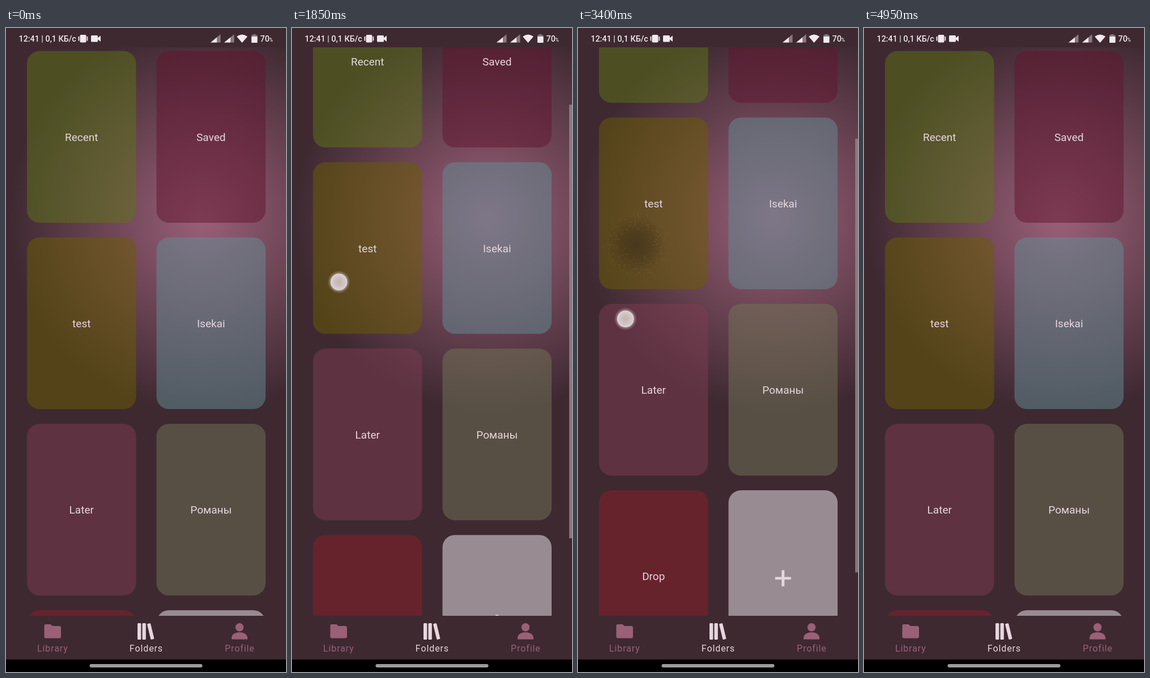
An HTML page with a canvas for the animation above (5150 ms loop, 494 by 1134 pixels).

```html
<!DOCTYPE html>
<html lang="en">
<head>
<meta charset="utf-8">
<title>Folders</title>
<style>
html, body { margin: 0; width: 100%; height: 100%; overflow: hidden; background: #3e2931; }
canvas { display: block; }
</style>
</head>
<body>
<canvas id="stage" width="494" height="1134"></canvas>
<script>
const ctx = document.getElementById('stage').getContext('2d');
const LOOP = 5150, BG = '#3e2931', ACCENT = '#9a6078', INK = '#e6d6dd';
const VIEW = { top: 34, bottom: 1035 }, VIEW_H = VIEW.bottom - VIEW.top;
const MAX_SCROLL = 311.5, CARD_W = 192.5, CARD_H = 302.3, ROW = 328.2, RADIUS = 22;
const IMPACT = 1978, PRESS = 3300;

const cards = [
  ['Recent', '#5c7717'], ['Saved', '#63142e'],
  ['test', '#6a5f01'], ['Isekai', '#648d95'],
  ['Later', '#7e3d51'], ['Романы', '#727759'],
  ['Drop', '#8e1f29'], ['+', '#f4edf3'],
];

const ramp = (t, from, to) => Math.min(1, Math.max(0, (t - from) / (to - from)));
const smooth = p => p * p * (3 - 2 * p);
const mix = (a, b, p) => a + (b - a) * p;
// Quick appearance at `on`, fade-out from `off` over `fade` ms.
const pulse = (t, on, off, fade) => ramp(t, on - 20, on) * (1 - ramp(t, off, off + fade));

const scrollAt = t => MAX_SCROLL * (ramp(t, 1700, IMPACT) ** 1.4 - smooth(ramp(t, 3260, 3632)));

// Overscroll: sharp rise when the fling hits the end, then a soft decay.
function stretchAt(t) {
  const u = Math.max(0, t - IMPACT) / 70;
  return 1 + .0248 * u * Math.exp(1 - u);
}

function random(seed) {
  return () => (seed = (seed * 16807) % 2147483647) / 2147483647;
}

function box(x, y, w, h, r, color) {
  ctx.fillStyle = color;
  ctx.beginPath();
  ctx.roundRect(x, y, w, h, r);
  ctx.fill();
}

function disc(x, y, r, color) {
  ctx.fillStyle = color;
  ctx.beginPath();
  ctx.arc(x, y, r, 0, 7);
  ctx.fill();
}

// Disc filled with evenly spaced radial colour stops.
function glow(x, y, r, ...colors) {
  const fill = ctx.createRadialGradient(x, y, 0, x, y, r);
  colors.forEach((c, i) => fill.addColorStop(i / (colors.length - 1), c));
  disc(x, y, r, fill);
}

function shape(path, color) {
  ctx.fillStyle = color;
  ctx.fill(new Path2D(path));
}

function text(str, x, y, font, color, align = 'center', spacing = 0) {
  ctx.font = font + ' Roboto, sans-serif';
  ctx.letterSpacing = spacing + 'px';
  ctx.textAlign = align;
  ctx.fillStyle = color;
  ctx.fillText(str, x, y);
}

// Dark press ripple with sparkles, drifting to the card's centre.
function ripple(x, y, t) {
  const p = ramp(t, PRESS, PRESS + 250);
  if (!p || t > PRESS + 300) return;
  const cx = x + mix(47, 96, p), cy = y + mix(273, 151, p), r = 130 * p;
  ctx.save();
  ctx.beginPath();
  ctx.roundRect(x, y, CARD_W, CARD_H, RADIUS);
  ctx.clip();
  ctx.globalAlpha = pulse(t, PRESS + 40, PRESS + 130, 170);
  glow(cx, cy, r, 'rgba(25,20,15,.34)', 'rgba(25,20,15,.22)', 'rgba(25,20,15,0)');
  const rnd = random(77);
  for (let i = 0; i < 300; i++) {
    const angle = rnd() * 2 * Math.PI, d = r * (.8 + (rnd() + rnd() - 1) * .4);
    ctx.fillStyle = `rgba(180,150,105,${.15 + rnd() * .35})`;
    ctx.fillRect(cx + d * Math.cos(angle), cy + d * Math.sin(angle), 1, 1);
  }
  ctx.restore();
}

function card([label, color], i, scroll, t) {
  const x = i % 2 ? 265.5 : 37, y = 40.6 + (i >> 1) * ROW - scroll;
  const cx = x + CARD_W / 2, cy = y + CARD_H / 2;
  ctx.globalAlpha = .5;
  box(x, y, CARD_W, CARD_H, RADIUS, color);
  ctx.globalAlpha = 1;
  if (label === 'test') ripple(x, y, t);
  if (label === '+') {
    box(cx - 14, cy + 1.5, 28, 4.5, 0, INK);
    box(cx - 2.5, cy - 10.5, 5, 28.5, 0, INK);
  } else {
    text(label, cx, cy + 7.2, '19px', INK);
  }
}

function list(t) {
  const scroll = scrollAt(t), total = VIEW_H + MAX_SCROLL;
  ctx.save();
  ctx.beginPath();
  ctx.rect(0, VIEW.top, 494, VIEW_H);
  ctx.clip();
  glow(346, 335, 341, ACCENT, BG);
  ctx.translate(0, VIEW.bottom);
  ctx.scale(1, stretchAt(t));
  ctx.translate(0, -VIEW.bottom);
  cards.forEach((c, i) => card(c, i, scroll, t));
  ctx.globalAlpha = .9 * (pulse(t, 1740, 2350, 250) + pulse(t, 3300, 3980, 220));
  box(489, VIEW.top + VIEW_H * scroll / total, 5, VIEW_H * VIEW_H / total, 0, '#8d8185');
  ctx.restore();
}

function statusBar() {
  const c = '#f3e9ee', dim = '#8a7880';
  text('12:41 | 0,1 КБ/с', 22.5, 24, '500 14.3px', c, 'left');
  box(130.5, 12, 11, 13.5, 2, c);
  for (const x of [127.5, 142.5]) box(x, 15, 1.8, 7.5, 0, c);
  box(150, 13, 12, 11.5, 1.5, c);
  shape('M161 18 L167 13.5 V24 L161 19.5Z', c);
  for (const x of [361, 385]) {
    shape(`M${x} 25.5 l17.5 -14.5 v14.5Z`, dim);
    shape(`M${x} 25.5 l11 -9.1 v9.1Z`, c);
  }
  shape('M407 15 Q416.5 8 426 15 L416.5 26Z', c);
  box(435.5, 11, 5, 3, 0, dim);
  box(433, 12.5, 10.5, 13.5, 1, dim);
  box(433, 15, 10.5, 11, 1, c);
  text('70', 448.5, 24, '500 14.3px', c, 'left');
  text('%', 464.5, 24, '500 8.5px', c, 'left');
}

function tabBar() {
  shape('M70 1050 H78.5 L82 1053 H94 Q97 1053 97 1056 V1071.5 Q97 1074.5 94 1074.5 H70.5 Q67.5 1074.5 67.5 1071.5 V1053 Q67.5 1050 70 1050Z', ACCENT);
  for (const x of [232, 240.5]) box(x, 1048, 6.3, 29, 1.5, INK);
  ctx.save();
  ctx.translate(255.2, 1062.5);
  ctx.rotate(-.24);
  box(-3.1, -14.3, 6.2, 28.6, 1.5, INK);
  ctx.restore();
  disc(412, 1055.3, 7.2, ACCENT);
  shape('M398 1076.5 V1074 C398 1060.5 426 1060.5 426 1074 V1076.5Z', ACCENT);
  ['Library', 'Folders', 'Profile'].forEach((label, i) =>
    text(label, 82.4 + 165 * i, 1098, '16px', i === 1 ? INK : ACCENT, 'center', .9));
  box(0, 1112, 494, 22, 0, '#000');
  box(147.5, 1120, 199, 6, 3, '#9b9b9b');
}

// Touch marker that swipes vertically between two moments, then lifts.
function swipe(t, down, move, lift, fromY, toY) {
  const p = smooth(ramp(t, move, lift));
  const x = mix(88, 81, p), y = mix(fromY, toY, p);
  ctx.globalAlpha = pulse(t, down, lift, 90);
  glow(x, y, 20, 'rgba(240,232,240,.8)', 'rgba(240,232,240,.6)', 'rgba(240,232,240,.5)', 'rgba(240,232,240,0)');
  glow(x, y, 14.8, '#c6b3b2', '#cbbab9', '#d2c5c6', '#ded3da');
  ctx.globalAlpha = 1;
}

function draw(t) {
  ctx.fillStyle = BG;
  ctx.fillRect(0, 0, 494, 1134);
  list(t);
  statusBar();
  tabBar();
  swipe(t, 1690, 1700, 1925, 616, 390);
  swipe(t, 3220, 3270, 3500, 345, 622);
}

const start = performance.now();
function tick() {
  draw((performance.now() - start) % LOOP);
  requestAnimationFrame(tick);
}
tick();
</script>
</body>
</html>
```
